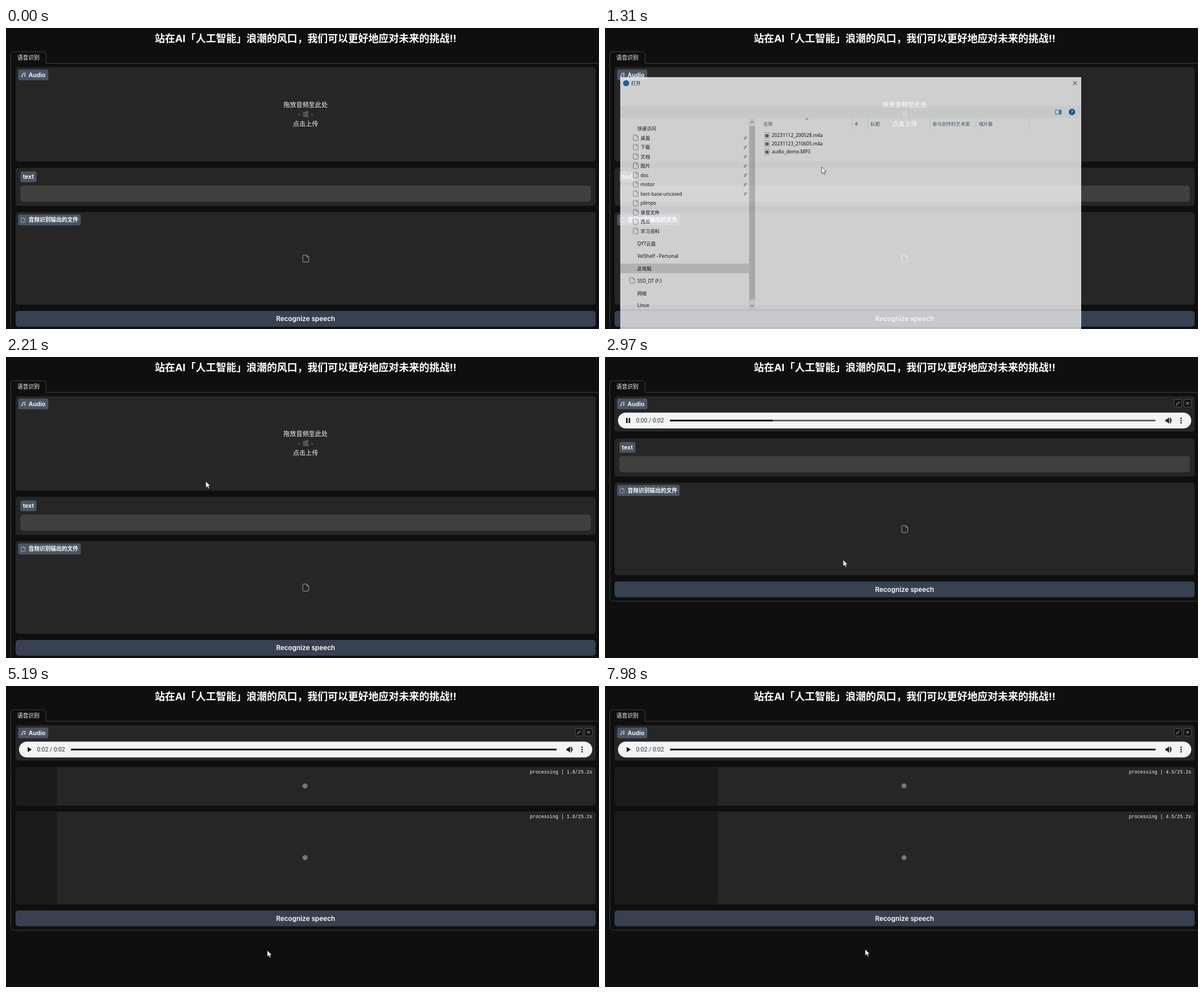
An HTML page for the animation above (8 s loop, 1051 by 533 pixels).

```html
<!DOCTYPE html>
<html lang="zh-CN">
<head>
<meta charset="utf-8">
<title>语音识别</title>
<style>
html, body { margin: 0; width: 100%; height: 100%; overflow: hidden; background: #0f0f0f; }
svg { display: block; width: 1051px; height: 533px; }
text { font-family: "Noto Sans", "Noto Sans CJK SC", sans-serif; white-space: pre; }
.ui text { font-family: Inter, "Noto Sans CJK SC", sans-serif; }
.ui text.mono { font-family: "Liberation Mono", monospace; }
.ui text.clock { font-family: Roboto, sans-serif; }
.b { font-weight: 600; }
.h { font-weight: 700; }
#cursor { animation: point 8s linear infinite; }
#dialog { transform-origin: 435px 302px; animation: dialog 8s linear infinite; }
#played { transform-origin: 115px 0; animation: play 8s linear infinite; }
@keyframes point {
  0%, .8% { transform: translate(828px, 405px); opacity: 0; }
  .87% { transform: translate(828px, 405px); opacity: 1; }
  3.5% { transform: translate(670px, 230px); }
  5.6%, 7% { transform: translate(555px, 152px); }
  10.3%, 20.6% { transform: translate(384px, 246px); }
  23.4%, 25.2% { transform: translate(354px, 218px); }
  27%, 32% { transform: translate(354px, 220px); }
  38.5% { transform: translate(440px, 396px); }
  40%, 48.6% { transform: translate(457px, 409px); }
  51.6% { transform: translate(460px, 470px); }
  56% { transform: translate(464px, 473px); }
  62%, 67% { transform: translate(463px, 468px); }
  70%, 78% { transform: translate(462px, 467px); }
  82%, 100% { transform: translate(461px, 466px); opacity: 1; }
}
@keyframes dialog {
  0%, 13.6% { transform: scale(.93); opacity: 0; }
  14.6% { transform: scale(.957); opacity: .15; }
  17% { transform: none; opacity: 1; }
  26.2% { transform: none; opacity: 1; }
  27.5%, 100% { transform: scale(.95); opacity: 0; }
}
@keyframes play {
  0%, 30.6% { transform: scaleX(0); }
  61.5%, 100% { transform: none; }
}
</style>
</head>
<body>
<svg viewBox="0 0 1051 533">
  <defs>
    <clipPath id="typeClip"><rect x="706" y="508" width="117" height="18"/></clipPath>
    <path id="sheet" d="M0 1.5Q0 0 1.5 0H7L10.5 3.5V11Q10.5 12.5 9 12.5H1.5Q0 12.5 0 11ZM7 0V3.5H10.5" fill="none"/>
  </defs>
  <g class="ui">
    <g id="page">
      <path d="M8.5 340V47a5 5 0 0 1 5-5H66a5 5 0 0 1 5 5V62.500H1051" fill="none" stroke="#404040"/>
    </g>
    <g id="drop"></g>
    <g id="player"></g>
    <g id="lower">
      <path d="M8.500 300V531a5 5 0 0 0 5 5H1051" fill="none" stroke="#404040"/>
      <g id="panels"></g>
      <g id="busy"></g>
      <g id="submit"></g>
    </g>
  </g>
  <g id="dialog">
    <g id="frame"></g>
    <g id="loading"></g>
    <g id="loaded"></g>
    <g id="picked"></g>
    <g id="files"></g>
  </g>
  <g id="cursor">
    <path id="arrow" d="M0 0V11.500L2.700 9.100L4.600 13.300L6.500 12.500L4.700 8.400H8.200Z" fill="#fff" stroke="#111" stroke-width=".7"/>
    <path id="hand" d="M-1.200 9V1Q0-1 1.200 1V6Q2.700 5 3.600 6.500Q5 6 5.600 7.400Q7 7.300 7 9V12Q6.500 14 5.300 16.500H-.800L-4.300 11Q-4.500 8.800-2.700 9.500L-1.200 11Z" fill="#fff" stroke="#111" stroke-width=".8"/>
  </g>
</svg>
<script>
const $ = id => document.getElementById(id);

function add(parent, tag, attrs, content) {
  const node = document.createElementNS('http://www.w3.org/2000/svg', tag);
  for (const key in attrs) node.setAttribute(key, attrs[key]);
  if (content) node.textContent = content;
  return (typeof parent === 'string' ? $(parent) : parent).appendChild(node);
}
const rect = (p, x, y, width, height, fill, more) => add(p, 'rect', { x, y, width, height, fill, ...more });
const shape = (p, d, fill, more) => add(p, 'path', { d, fill, ...more });
const line = (p, d, stroke, more) => shape(p, d, 'none', { stroke, ...more });
const dot = (p, cx, cy, r, fill) => add(p, 'circle', { cx, cy, r, fill });
// y is the middle of the line of text
const label = (p, x, y, str, size = 8.5, fill = '#111', more) =>
  add(p, 'text', { x, y: y + size * .37, 'font-size': size, fill, ...more }, str);
const mid = { 'text-anchor': 'middle' }, end = { 'text-anchor': 'end' };

// ---- web page
const PANEL = '#262626', round = { rx: 5 };
const sheet = (p, x, y, k, stroke) =>
  add(p, 'use', { href: '#sheet', stroke, transform: `translate(${x} ${y}) scale(${k})` });

function audioTag(p) {
  rect(p, 21.5, 73.5, 53.500, 19, '#4b5563', { rx: 3.5 });
  line(p, 'M29 85.500V80.500L34 79.500V84.500M29 82L34 81', '#cbd5e1', { 'stroke-width': .8 });
  dot(p, 28, 85.600, 1.300, '#cbd5e1');
  dot(p, 33, 84.600, 1.300, '#cbd5e1');
  label(p, 40, 83, 'Audio', 10.6, '#fff', { class: 'b' });
}

label('page', 531, 18, '站在AI「人工智能」浪潮的风口，我们可以更好地应对未来的挑战!!', 18, '#fff', { ...mid, class: 'h' });
label('page', 20, 52, '语音识别', 9.8, '#fff');

rect('drop', 17, 69.5, 1028, 167, PANEL, round);
audioTag('drop');
label('drop', 531, 136, '拖放音频至此处', 11.2, '#f3f4f6', mid);
label('drop', 531, 152.5, '- 或 -', 11.2, '#8b8b8b', mid);
label('drop', 531, 169.5, '点击上传', 11.2, '#f3f4f6', mid);

rect('player', 17, 69.500, 1028, 62.500, PANEL, round);
audioTag('player');
for (const x of [1009, 1026]) rect('player', x, 75.5, 13, 13, '#0f0f0f', { rx: 2, stroke: '#525252' });
line('player', 'M1012.500 85L1013 83L1017 79L1018.500 80.500L1014.500 84.500Z', '#bbb', { 'stroke-width': .8 });
line('player', 'M1030 79.500L1035 84.500M1035 79.500L1030 84.500', '#ddd');
rect('player', 23, 98.500, 1016, 28, '#f1f3f4', { rx: 14 });
const playIcon = shape('player', 'M38.500 108L45.500 112.500L38.500 117Z', '#000');
const pauseIcon = shape('player', 'M37.500 108H40V117H37.500ZM42 108H44.500V117H42Z', '#000');
const clock = label('player', 55, 112.5, '0:00 / 0:02', 10.4, '#333', { class: 'clock' });
rect('player', 115, 111, 861, 3, '#666', { rx: 1.5 });
rect('player', 115, 111, 861, 3, '#000', { rx: 1.5, id: 'played' });
shape('player', 'M993.500 110.500H996L999.500 107V118L996 114.500H993.500Z', '#000');
line('player', 'M1001 110Q1003 112.500 1001 115M1001 107.500Q1006.500 112.500 1001 117.500', '#000', { 'stroke-width': 1.1 });
for (const y of [108.500, 112.500, 116.500]) dot('player', 1021, y, 1.300, '#000');

rect('panels', 17, 247.500, 1028, 67.500, PANEL, round);
rect('panels', 25.500, 254, 28.500, 19, '#4b5563', { rx: 3.5 });
label('panels', 39.700, 263.5, 'text', 10.5, '#fff', { ...mid, class: 'b' });
rect('panels', 25.500, 279, 1011, 28.500, '#3f3f3e', round);
rect('panels', 17, 326, 1028, 164, PANEL, round);
rect('panels', 21.500, 330, 111, 19.500, '#4b5563', { rx: 3.5 });
sheet('panels', 27, 336, .65, '#cbd5e1');
label('panels', 40, 339.5, '音频识别输出的文件', 9.8, '#fff', { class: 'h' });
sheet('panels', 526, 402, 1, '#a3a3a3');

const timers = [], bars = [];
for (const [y, h] of [[247, 68], [326, 164]]) {
  rect('busy', 17, y, 1028, h, PANEL, round);
  bars.push(rect('busy', 17, y, 0, h, '#1b1b1b', round));
  dot('busy', 530, y + h / 2 - .5, 4.5, '#777');
  timers.push(label('busy', 1039, y + 8.5, '', 8.4, '#f3f4f6', { ...end, class: 'mono' }));
}

const button = rect('submit', 17, 501, 1028, 28, '#374151', round);
label('submit', 531, 515, 'Recognize speech', 11.8, '#fff', { ...mid, class: 'b' });

// ---- file dialog
const icons = {
  folder: ['M0 0H4L5 1H9.500V10H0Z', '#f9d56e'],
  cloud: ['M0 5A4 4 0 0 1 8 5A4 4 0 0 1 0 5Z', '#1686d9'],
  pc: ['M-1 1H10V7.500H-1ZM2 8.500H8V9.500H2Z', '#2f8fd8'],
  cube: ['M0 2L5 0L10 2V8L5 10L0 8Z', '#21a5d6'],
  film: ['M0 0H10V10H0ZM3 2V4.500H7V2ZM3 5.500V8H7V5.500Z', '#334a63'],
  image: ['M0 1H10V9H0ZM1 2V6L4 4L6 6L9 5V2Z', '#6f9dbd'],
  doc: ['M1 0H9V10H1ZM2.500 2V3H7.500V2ZM2.500 4.500V5.500H7.500V4.500ZM2.500 7V8H7.500V7Z', '#7d8f9f'],
  down: ['M3 0H7V5H10L5 10L0 5H3Z', '#1e7fd0'],
  note: ['M4 0Q5 3 8 4L7 6L5.500 5V8Q5 10 3 10Q1 9 2.500 7H4Z', '#1e90e0'],
  desk: ['M-1 1H10V9H-1Z', '#0f86dc'],
  drive: ['M1 4.500H9L10.500 6V9H0V6Z', '#555'],
  sys: ['M0 1H2.500V3.500H0ZM3 1H5.500V3.500H3ZM1 5H9L10.500 6.500V9.500H0V6.500Z', '#3c7190'],
  disc: ['M3 4A3 3 0 0 1 9 4A3 3 0 0 1 8 6L10 9H0V6H4Z', '#666']
};
function icon(p, name, x, y) {
  const [d, fill] = icons[name];
  shape(p, d, fill, { 'fill-rule': 'evenodd', transform: `translate(${x} ${y})` });
}
const chevron = (p, x, y, dir = 1) =>
  line(p, `M${x - 2.5} ${y - dir * 1.2}L${x} ${y + dir * 1.3}L${x + 2.5} ${y - dir * 1.2}`, '#444');
const STEP = 16.68;

rect('frame', 22, 85, 826, 470, '#fff');
dot('frame', 33, 95.5, 5.5, '#1673bd');
label('frame', 42, 95.5, '打开');
line('frame', 'M834 92L841 99M841 92L834 99', '#222');
rect('frame', 22, 136, 826, 22, '#f5f6f7');
line('frame', 'M802.500 143.500H812.500V151H802.500Z', '#4886ad');
rect('frame', 808.500, 143.500, 4, 7.500, '#4886ad');
dot('frame', 832, 147, 5.700, '#0063b1');
label('frame', 832, 147, '?', 8.500, '#fff', { ...mid, class: 'h' });
rect('frame', 253, 158, 11.500, 342, '#f0f0f0');
chevron('frame', 259, 165, -1);
chevron('frame', 259, 494);
rect('frame', 22, 500, 826, 55, '#f0f0f0');
line('frame', 'M438.500 158V178M466.500 158V178M577.500 158V178M660.500 158V178M755.500 158V178', '#e2e2e2');
chevron('frame', 357, 160, -1);
for (const [x, str] of [[279, '名称'], [443, '#'], [471, '标题'], [582, '参与创作的艺术家'], [665, '唱片集']])
  label('frame', x, 168, str, 8.400, '#4c607a');

// first paint: sidebar at its top
rect('loading', 22, 418.500, 231, 17, '#d9d9d9');
rect('loading', 253.500, 172, 10.500, 311, '#cdcdcd');
label('loading', 53, 177, '快速访问');
['桌面', '下载', '文档', '图片', 'doc', 'motor', 'bert-base-uncased', 'plimpo', '录音文件', '西瓜', '学习资料']
  .forEach((str, i) => {
    const y = 177 + STEP * (i + 1);
    sheet('loading', 46, y - 5.500, .8, '#777');
    label('loading', 59, y, str);
    if (i < 7) line('loading', `M244 ${y + 3}L246 ${y + 1}L244.500 ${y - .5}L248 ${y - 3}L249 ${y - 1}L246.500 ${y + 1.5}Z`, '#777');
  });
['QYT云盘', 'VelShelf - Personal', '此电脑', 'SSD_DT (F:)', '网络', 'Linux']
  .forEach((str, i) => label('loading', 53, 382.700 + 22.150 * i, str));
sheet('loading', 40, 443.500, .8, '#777');

// full content
line('loaded', 'M40 120.500H32M35 117.500L32 120.500L35 123.500M52 120.500H60M57 117.500L60 120.500L57 123.500', '#c8c8c8');
chevron('loaded', 72, 120.5);
line('loaded', 'M87 125V116.500M83.500 120L87 116.500L90.500 120', '#444', { 'stroke-width': 1.2 });
line('loaded', 'M96.500 110.500H691V131H96.500ZM667.500 110V131M699.500 110.500H839.500V131H699.500Z', '#d9d9d9');
icon('loaded', 'folder', 99.500, 115.5);
for (const x of [117, 159, 218, 259]) line('loaded', `M${x - 1} 118L${x + 1.2} 120.500L${x - 1} 123`, '#444');
for (const [x, str] of [[125, '此电脑'], [167, '新加卷 (D:)'], [227, 'motor'], [267, '录音文件']])
  label('loaded', x, 120.500, str);
chevron('loaded', 655, 121);
line('loaded', 'M681 118A3.300 3.300 0 1 0 682 121M682 116V118.500H679.500', '#444');
line('loaded', 'M710.500 124L713.500 121M713 119.500A2.500 2.500 0 1 1 718 119.500A2.500 2.500 0 1 1 713 119.500', '#777', { 'stroke-width': .8 });
label('loaded', 727, 120.5, '在 录音文件 中搜索', 8.400, '#555');
label('loaded', 35, 147, '组织', 8.500, '#1e395b');
label('loaded', 82, 147, '新建文件夹', 8.400, '#1e395b');
shape('loaded', 'M55 145.500H61L58 149ZM780.500 145.500H786.500L783.500 149Z', '#333');
line('loaded', 'M764 144H766M764 147H766M764 150H766M768 144H770M768 147H770M768 150H770M772 144H774M772 147H774M772 150H774', '#666');
rect('loaded', 253.500, 259, 10.500, 191, '#cdcdcd');
rect('loaded', 22, 408.500, 231, 16.700, '#d9d9d9');

const row = (y, name, str, x = 45) => {
  icon('loaded', name, x, y - 5);
  label('loaded', x + 14, y, str);
};
['录音文件', '西瓜', '学习资料'].forEach((str, i) => row(166.500 + STEP * i, 'folder', str));
row(222.500, 'cloud', 'QYT云盘', 39.5);
row(244.500, 'cloud', 'VelShelf - Personal', 39.5);
row(266.500, 'pc', '此电脑', 39.5);
[['cube', '3D 对象'], ['film', '视频'], ['image', '图片'], ['doc', '文档'], ['down', '下载'], ['note', '音乐'],
 ['desk', '桌面'], ['sys', '本地磁盘 (C:)'], ['drive', '新加卷 (D:)'], ['drive', '新加卷 (E:)'],
 ['drive', 'SSD_DT (F:)'], ['drive', 'others (G:)'], ['disc', 'CD 驱动器 (H:)']]
  .forEach(([name, str], i) => row(266.500 + STEP * (i + 1), name, str));

label('loaded', 152, 516.500, '文件名(N):', 8.500, '#111', end);
rect('loaded', 156, 508, 541, 17, '#fff', { stroke: '#0078d7' });
chevron('loaded', 690, 517);
rect('loaded', 706, 508, 130, 17, '#e4e4e4', { stroke: '#adadad' });
label('loaded', 708.500, 516.500, '自定义文件 (*.mp3;*.opus;*.ogg)', 8.500, '#111', { 'clip-path': 'url(#typeClip)' });
chevron('loaded', 829, 517);
rect('loaded', 706.500, 531, 59, 17, '#e1e1e1', { stroke: '#0078d7', 'stroke-width': 1.6 });
rect('loaded', 776, 531, 59, 17, '#e1e1e1', { stroke: '#adadad' });

rect('picked', 277.500, 211, 475, 14.500, '#cce8ff', { stroke: '#99d1ff' });
label('picked', 159, 516.500, 'audio_demo.MP3');
['20231112_200528.m4a', '20231123_210605.m4a', 'audio_demo.MP3'].forEach((str, i) => {
  const y = 189 + 14.6 * i;
  rect('files', 281.500, y - 5, 8, 10, '#fff', { stroke: '#999', 'stroke-width': .8 });
  dot('files', 285.500, y + .5, 2.700, '#333');
  dot('files', 285.500, y + .5, .9, '#fff');
  label('files', 294, y, str);
});

// ---- states over time
const show = (node, on) => { node.style.display = on ? '' : 'none'; };

function render(t) {
  const uploaded = t >= 2410, playing = t >= 2450 && t < 4920;
  show($('loading'), t < 1420);
  show($('loaded'), t >= 1420);
  show($('picked'), t >= 1900);
  show($('drop'), !uploaded);
  show($('player'), uploaded);
  $('lower').setAttribute('transform', `translate(0 ${uploaded ? -103.6 : 0})`);
  show(playIcon, !playing);
  show(pauseIcon, playing);
  clock.textContent = `0:0${Math.max(0, Math.min(2, Math.floor((t - 2450) / 1000)))} / 0:02`;

  const hover = t >= 3090 && t < 3960;
  button.setAttribute('fill', hover ? '#6b7280' : '#374151');
  show($('hand'), hover);
  show($('arrow'), !hover);

  // the job's clock runs slightly slower than playback
  const tenths = Math.max(0, Math.floor((t - 3282) * .00965));
  const queued = tenths < 6, secs = (tenths / 10).toFixed(1);
  show($('busy'), t >= 3282);
  for (const timer of timers) timer.textContent = queued ? `${secs}s` : `processing | ${secs}/25.2s`;
  for (const bar of bars) bar.setAttribute('width', queued ? 0 : 1028 * tenths / 252);
}

let start;
function tick(now) {
  start ??= now;
  render((now - start) % 8000);
  requestAnimationFrame(tick);
}
render(0);
requestAnimationFrame(tick);
</script>
</body>
</html>
```
